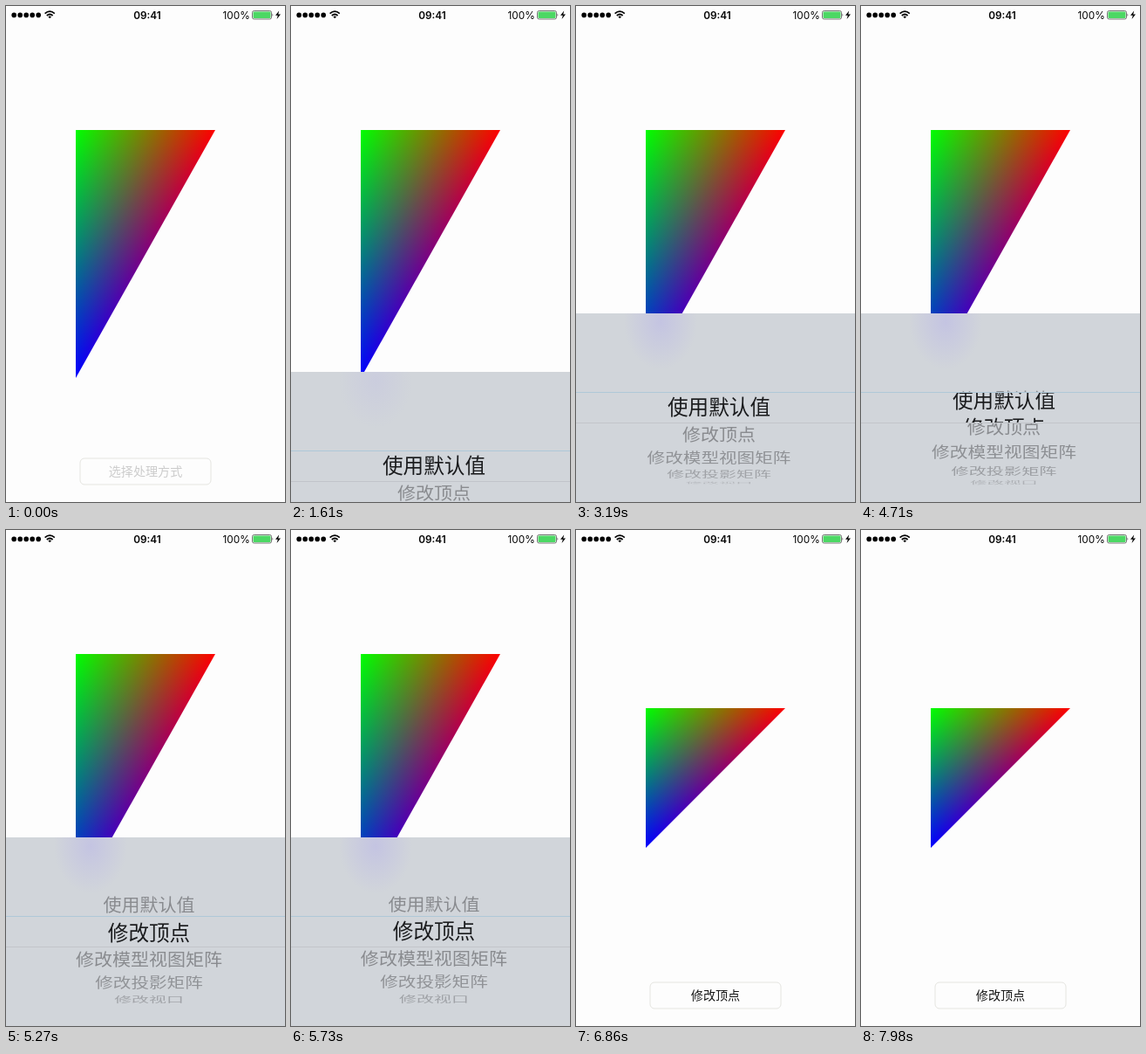
Animation, 320 px wide and 568 px high, one loop 8 s. Source, as an HTML page:

```html
<!DOCTYPE html>
<html lang="zh-CN">
<head>
<meta charset="utf-8">
<title>Triangle picker</title>
<style>
  html, body { margin: 0; width: 100%; height: 100%; overflow: hidden; background: #fdfdfd; }
  svg { display: block; width: 320px; height: 568px; }
  text { font-family: "Noto Sans CJK SC", "Noto Sans CJK", "Noto Sans SC", sans-serif; text-anchor: middle; }
  .status text { font: 11.8px Inter, Roboto, sans-serif; fill: #050505; }
  .status .clock { font-weight: 600; }
  .add { mix-blend-mode: screen; }
</style>
</head>
<body>
<svg viewBox="0 0 320 568">
  <defs>
    <linearGradient id="red"><stop stop-color="#000"/><stop offset="1" stop-color="#f00"/></linearGradient>
    <linearGradient id="blue" x2="0" y2="1"><stop stop-color="#000"/><stop offset="1" stop-color="#00f"/></linearGradient>
    <linearGradient id="green" x2=".5" y2=".5"><stop stop-color="#0f0"/><stop offset="1" stop-color="#000"/></linearGradient>
    <radialGradient id="haze">
      <stop stop-color="#bdbbe6" stop-opacity=".65"/><stop offset="1" stop-color="#bdbbe6" stop-opacity="0"/>
    </radialGradient>
    <clipPath id="corner"><path d="M0 0H1L0 1Z"/></clipPath>
    <clipPath id="sheet"><rect width="320" height="216"/></clipPath>
    <clipPath id="lens"><rect y="91" width="320" height="34"/></clipPath>
    <clipPath id="outside"><path d="M0 0H320V90H0ZM0 126H320V216H0Z"/></clipPath>
  </defs>

  <rect width="320" height="568" fill="#fdfdfd"/>

  <g id="triangle" clip-path="url(#corner)">
    <rect width="1" height="1" fill="url(#red)"/>
    <rect width="1" height="1" fill="url(#blue)" class="add"/>
    <rect width="1" height="1" fill="url(#green)" class="add"/>
  </g>

  <rect x="85" y="518" width="150" height="30" rx="5" fill="none" stroke="#e5e5e0"/>
  <text id="label" x="160" y="538.2" font-size="14.1"></text>

  <g id="panel" clip-path="url(#sheet)">
    <rect width="320" height="216" fill="#d1d5da"/>
    <ellipse id="glow" cx="97" cy="10" rx="42" ry="54" fill="url(#haze)"/>
    <g id="wheel" clip-path="url(#outside)" font-size="21.2" fill="#898b8f"></g>
    <g id="focus" clip-path="url(#lens)" font-size="23.6" fill="#1a1b1d"></g>
    <path d="M0 90.5H320" stroke="#afc8d8"/>
    <path d="M0 125.5H320" stroke="#c2c5ca"/>
  </g>

  <g class="status">
    <g id="signal" fill="#000"></g>
    <g fill="none" stroke="#000" stroke-width="1.7">
      <path d="M44.6 8.6Q50.2 3.8 55.8 8.6M46.8 11Q50.2 8 53.6 11"/>
      <path d="M50.2 14.2L48.4 12.2Q50.2 10.8 52 12.2Z" fill="#000" stroke="none"/>
    </g>
    <text class="clock" x="162" y="14.6">09:41</text>
    <text x="264.2" y="14.6">100%</text>
    <rect x="282.5" y="5.5" width="22" height="9.5" rx="2" fill="#fdfdfd" stroke="#555" stroke-width=".8"/>
    <rect x="283.5" y="6.5" width="20" height="7.5" rx="1" fill="#4cd864"/>
    <path d="M305.5 8.4Q307.2 10.2 305.5 12Z" fill="#555"/>
    <path d="M313.2 5.4L309 10.8H311.8L310.6 15L315 9.4H312.2Z" fill="#000"/>
  </g>
</svg>

<script>
const LOOP = 8000, PRESS = 1330, OPEN = 1480, SCROLL = 4570, CLOSE = 6132;
const SLIDE_RATE = 0.01826, SCROLL_RATE = 0.0069, FADE = 470;
const ROWS = ['使用默认值', '修改顶点', '修改模型视图矩阵', '修改投影矩阵', '修改视口'];
const RADIUS = 87.6, STEP = 20.7 * Math.PI / 180, PITCH = 32, MIDDLE = 107.3, AXIS = 164;

const $ = id => document.getElementById(id);
const clamp = v => Math.min(1, Math.max(0, v));

function add(parent, tag, attrs, content = '') {
  const el = document.createElementNS('http://www.w3.org/2000/svg', tag);
  for (const k in attrs) el.setAttribute(k, attrs[k]);
  el.textContent = content;
  return parent.appendChild(el);
}

for (let i = 0; i < 5; i++) add($('signal'), 'circle', { cx: 9.2 + 7 * i, cy: 10.4, r: 2.8 });
const wheel = ROWS.map(name => add($('wheel'), 'text', { y: 8 }, name));
const focus = ROWS.map(name => add($('focus'), 'text', { y: 9 }, name));

// Critically damped spring from 0 to 1
function spring(ms, rate) {
  const x = Math.max(0, ms) * rate;
  return 1 - Math.exp(-x) * (1 + x);
}

// Rows sit on a cylinder; the selected one is magnified in a flat lens
function drawPicker(pos) {
  ROWS.forEach((_, i) => {
    const angle = (i - pos) * STEP, flat = Math.cos(angle);
    const shown = Math.abs(angle) < Math.PI / 2;
    const wide = 1 - 0.11 * (1 - flat);
    wheel[i].setAttribute('transform',
      `translate(${AXIS} ${MIDDLE + RADIUS * Math.sin(angle)}) scale(${wide} ${Math.max(flat, 0.01)})`);
    wheel[i].setAttribute('opacity', shown ? clamp(0.3 + 0.8 * flat) : 0);
    focus[i].setAttribute('transform', `translate(${AXIS} ${MIDDLE + (i - pos) * PITCH})`);
  });
}

function draw(t) {
  const changed = t >= CLOSE;
  const height = changed ? 160 : 284;
  $('triangle').setAttribute('transform', `translate(80 ${284 - height / 2}) scale(160 ${height})`);

  // The label dims at once on touch and fades back after release
  const release = t < PRESS ? 30 : OPEN;
  const shade = Math.round(204 - 180 * clamp((t - release) / FADE));
  $('label').setAttribute('fill', `rgb(${shade},${shade},${shade})`);
  $('label').textContent = changed ? ROWS[1] : '选择处理方式';

  const raised = changed ? 1 - spring(t - CLOSE, SLIDE_RATE) : spring(t - OPEN, SLIDE_RATE);
  $('panel').setAttribute('transform', `translate(0 ${568 - 216 * raised})`);
  $('glow').setAttribute('opacity', changed ? 0 : raised ** 2);
  drawPicker(spring(t - SCROLL, SCROLL_RATE));
}

const start = performance.now();
function tick() {
  draw((performance.now() - start) % LOOP);
  requestAnimationFrame(tick);
}
tick();
</script>
</body>
</html>
```
